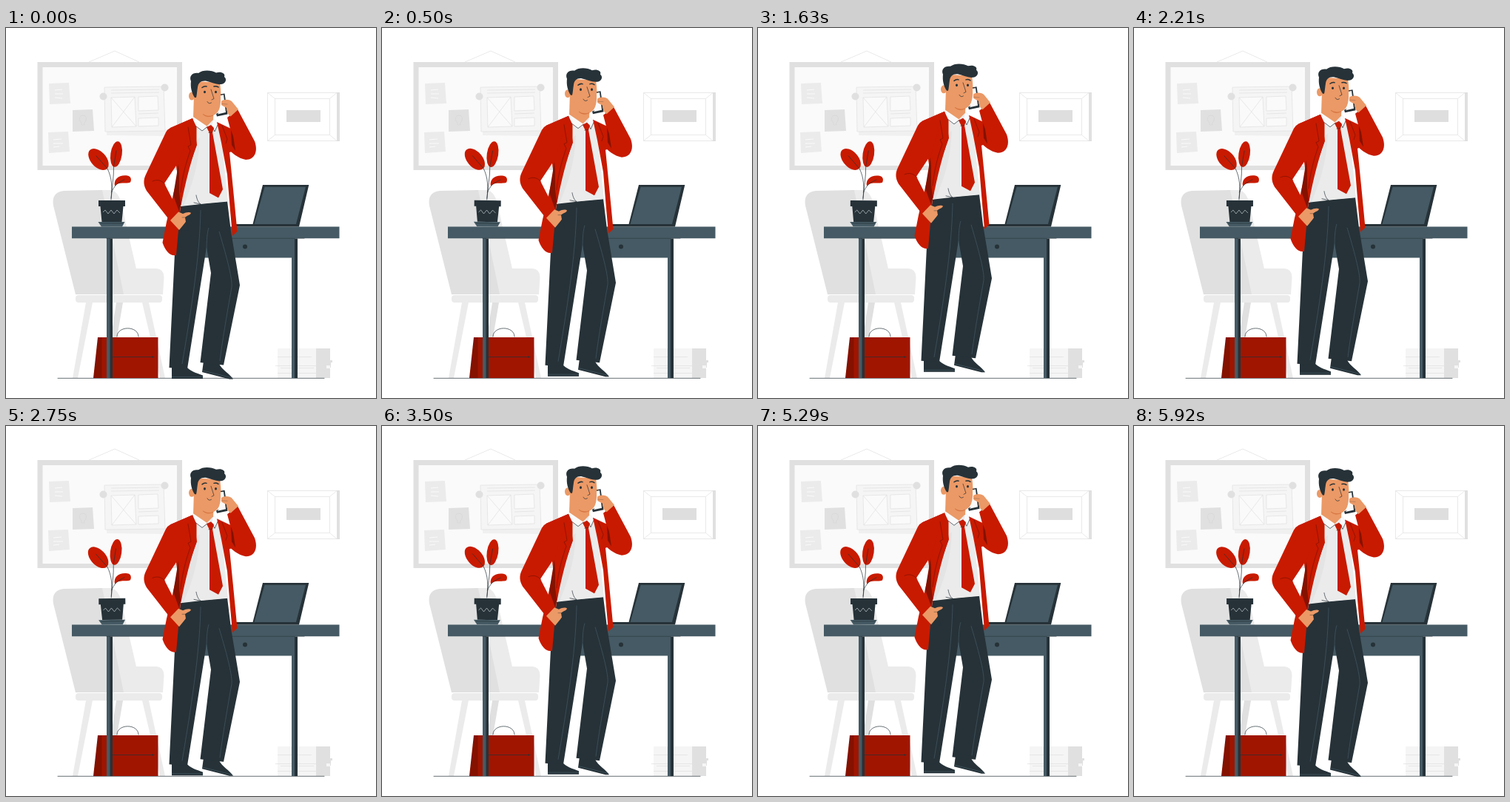
Recreate the animation shown at these times as an HTML page. Size 500 by 500 pixels, loop 5960 ms.

```html
<!DOCTYPE html>
<html lang="en">
<head>
<meta charset="utf-8">
<title>Office call</title>
<style>
  html, body { margin: 0; width: 100%; height: 100%; overflow: hidden; background: #fff; }
  svg { display: block; width: 100vw; height: 100vh; }
  .red { fill: #c81a00; }
  .wine { fill: #851100; }
  .ink { fill: #263238; }
  .slate { fill: #455a64; }
  .skin { fill: #eb9966; }
  .g1 { fill: #fafafa; }
  .g2 { fill: #ebebeb; }
  .g3 { fill: #e0e0e0; }
  .line { fill: none; stroke: #263238; stroke-width: .7; stroke-linecap: round; stroke-linejoin: round; }
  .brow { stroke-width: 1.5; }
  .pale { fill: none; stroke: #e0e0e0; stroke-width: .7; }
  .seam { fill: none; stroke: #455a64; stroke-width: .7; }
  .fold { fill: none; stroke: #7d1000; stroke-width: .7; stroke-linecap: round; }
</style>
</head>
<body>
<svg viewBox="0 0 500 500">
  <!-- whiteboard -->
  <path class="pale" d="M112 46L147 31L180 46"/>
  <path class="g3" d="M42.500 46H238V192H42.500Z"/>
  <path class="g1" d="M49.500 53H231V186H49.500Z"/>
  <path class="g2" d="M58 75L85 74L87 102L59 103ZM57 141L84 140L86 167L58 169Z"/>
  <path class="g3" d="M90 111L117 110L119 139L90 140Z"/>
  <path d="M102 128C98 124 99 118 104 118C109 118 110 124 106 128V131H102Z" fill="none" stroke="#d6d6d6" stroke-width=".7"/>
  <path d="M66 84l10-1M66 89h11M66 94l10 1M64 151l11-1M64 156h13M64 161l8-1" fill="none" stroke="#fafafa"/>
  <path d="M136 140L216 137L217 146L136 145Z" fill="#f0f0f0"/>
  <path d="M133 80L213 79L215 139L134 140Z" fill="#f5f5f5" stroke="#e0e0e0" stroke-width=".7"/>
  <path class="pale" d="M142 84L207 83M142 88L207 87M179 116L206 115"/>
  <path class="g1" d="M142 94L174 93L176 133L143 134ZM179 93L205 92L206 111L179 112ZM179 122L206 121V132L179 133Z" stroke="#e0e0e0" stroke-width=".7"/>
  <path class="pale" d="M142 94L176 133M174 93L143 134"/>
  <g class="g3"><circle cx="131.500" cy="92.500" r="5"/><circle cx="214.500" cy="80.500" r="5"/></g>

  <!-- picture frame -->
  <path class="g3" d="M447 87H451V153H447Z"/>
  <path class="pale" d="M353.500 87.500H450.500V152.500H353.500ZM363.500 95.500H437.500V144.500H363.500ZM353.500 87.500L363.500 95.500M447 87.500L437.500 95.500M447 152.500L437.500 144.500M353.500 152.500L363.500 144.500"/>
  <path d="M379 111H425V127H379Z" fill="#dedede"/>

  <!-- chair -->
  <path class="g2" d="M108 371H117L97 473H90ZM184 371H193L215 473H208Z"/>
  <path class="g3" d="M149 371H158L150 418H142Z"/>
  <path class="g2" d="M125 219H141Q152 220 156 238L176 325H202Q213 325 213.500 337L212 360H150Z"/>
  <path class="g3" d="M78 220L130 219L159 360H94L64 240Q61 222 78 220Z"/>
  <rect class="g2" x="94" y="361" width="117" height="10" rx="4"/>

  <!-- papers -->
  <path d="M367 433H419V473H367Z" fill="#f5f5f5"/>
  <path class="g3" d="M419 433H438V449H441V452H439V459H438V473H419Z"/>
  <path d="M433 456H438V460H433Z" fill="#f5f5f5"/>
  <path class="pale" d="M367 444.500H413M364 456.500H419M371 459.500H416M367 466.500H419"/>
  <path class="line" d="M70 473.300H430"/>

  <!-- bag -->
  <path class="wine" d="M124 418H131L130 473H118Z"/>
  <path d="M129.500 418H205.500V473H129.500Z" fill="#a01500"/>
  <path class="line" d="M144 444.500H200M150 417C150 402 179 402 179 417"/>
  <circle class="ink" cx="198" cy="444.500" r="1"/>

  <!-- desk -->
  <path class="slate" d="M240 284H388V310.500H240ZM136 284H141V473H136ZM386 284H390.500V473H386ZM89 268.400H450.500V284.300H89Z"/>
  <path class="ink" d="M140.500 284.500H144V473H140.500ZM390 284.500H394V473H390Z"/>
  <path class="line" d="M136 284.300H403" stroke-opacity=".7"/>
  <circle class="ink" cx="323" cy="295.500" r="3"/>
  <path class="ink" d="M347 212H409.300L396 268.400H308V265H333.500Z"/>
  <path class="slate" d="M349.500 214.800H405L392 265H335.500Z"/>

  <g id="plant">
    <ellipse class="red" cx="125" cy="177.500" rx="17" ry="10.300" transform="rotate(48 125 177.500)"/>
    <ellipse class="red" cx="149" cy="170.500" rx="7.700" ry="17.500" transform="rotate(8 149 170.500)"/>
    <path class="red" d="M147 213.500C145 204 153 198 164 199.500C169 200 170 205 168 208.500C162 211 153 207 147 213.500Z"/>
    <path class="line" d="M142 232C144 215 143 202 137 190L122 173M142 230C143 215 146 202 145.500 187L149 166M142.500 222C146 214 150 209 160 205"/>
    <path class="ink" d="M125 233H161V241H158.500L156.500 262H129.500L127.500 241H125Z"/>
    <path d="M131 249l3-3 4 5 4-5 4 5 4-5 4 4" fill="none" stroke="#c5ccd0" stroke-width=".7"/>
    <path class="slate" d="M124.500 262H160.500L157 268.400H129Z"/>
    <path class="line" d="M128 264H158"/>
  </g>

  <g id="man">
    <!-- shoes and trousers -->
    <path class="ink" d="M224 458H244C249 464 257 466 266 469.500V474H224ZM267 450L288 454C292 462 302 467 307 474.500L302 474.500L265 465Z"/>
    <path class="seam" d="M224 471.500H266M266 463L306 473"/>
    <path class="ink" d="M236 240L299 234L304 275L316 347.500L294 455.500L262.500 452L277 331L271 296L245 460.500L220.500 459L228 305Z"/>
    <path class="seam" d="M263 246C262 300 254 360 238 454M274 270C272 276 271 286 271 302M288 275C300 315 306 340 305 350C298 390 292 425 289 450"/>

    <!-- shirt and tie -->
    <path class="g2" d="M252 121L282 123L290 138L300 234.500Q268 237 236 241L240 190Z"/>
    <path class="g3" d="M257 152L262 148C260 190 250 215 240 240L236 241Z" opacity=".6"/>
    <path class="line" d="M257 226C258 232 260 236 263 238M254 236L263 238"/>
    <path class="skin" d="M254 90L253 121L271 133L280 124L281 110Z"/>
    <path class="g1" d="M253 120L272 133L265 139L252 129ZM281 122L286 131L282 140L278 132Z"/>
    <path class="line" d="M252 129L265 139L272 133.500M279 134L282 140L286 131"/>
    <path class="red" d="M271 134L277 131L281 135L279 141L293 218L287 229.500L275 223L275 142Z"/>
    <path class="fold" d="M274 141.500L279 140.500"/>

    <!-- jacket -->
    <path class="red" d="M285 127L304 136L308 166L302 168L307 218L312.500 275L306 281L302 235L299 198L291 155Z"/>
    <path class="red" d="M252 122L222 135L232 200L217 262L211.500 290C215 301 222 309 230 307L236 240L243 200L258 158Z"/>
    <path class="wine" d="M233 184L226 226L234 248L237 236Z"/>
    <path class="red" d="M252 122L222 135Q218 137 216 141L189 198C185 206 186 213 190 220L222 261L234 249L214 210L234 180Z"/>
    <path class="red" d="M252 122L257.500 134V158C250 180 242 210 236.500 240L234 222L234 180Z"/>
    <path class="fold" d="M198 207C205 204 210 206 215 211M246 134L250 158L246 160L249 166C244 180 238 200 236 222M292 132L299 150L297 156"/>
    <path class="red" d="M299 121L313 110L336 153C341 167 336 178 324 178C314 176 304 169 299 161L304 140Z"/>
    <path class="wine" d="M304 138L307 146L310 166L305 158Z"/>

    <!-- pocket hand -->
    <path class="skin" d="M233 248.500L239 251C243 249 248 248 250 250C249 253 245 253 242 256L243 262L234 273L222 260Z"/>
    <path class="line" d="M242 256L238 256" stroke-opacity=".6"/>
    <path class="ink" d="M237 273L244 260L247 274Z"/>

    <!-- head -->
    <path class="skin" d="M257 72L289 74C291 86 291 102 288 110C284 119 275 121 267 117L254 108L254 90Z"/>
    <path d="M266 116.500Q273 121 280 118Q272 122 266 116.500Z" fill="#d06f3c" stroke="#d06f3c" stroke-width=".5"/>
    <ellipse class="skin" cx="251" cy="92" rx="4" ry="5.500"/>
    <path class="ink" d="M255 94C251 88 249 80 250 72C247 65 252 60 260 61C266 56 278 57 284 60.500C290 58.500 297 61 295 66C299 69 297 75 291 76C284 77 277 73 270 71.500C263 71 260 74 259 80C258 86 258 90 257 94Z"/>
    <ellipse class="ink" cx="268.500" cy="86.500" rx="1.500" ry="1.800"/>
    <ellipse class="ink" cx="283.500" cy="86.500" rx="1.500" ry="1.800"/>
    <path class="line brow" d="M265 80.500Q268 78 271 79M281 79Q284 78 287 80"/>
    <path class="line" d="M277 83L281 95.500L278 97M272 99.500Q274 103.500 277.500 101"/>

    <!-- phone and hand -->
    <path class="ink" d="M290 89.500L295.500 88.500L299.500 116.500L285 119.500L284 116L290 113Z"/>
    <path class="g1" d="M290 91L294 90.300L297 114L286 116.500L290 110Z"/>
    <path class="skin" d="M291 99C294 96 301 96 305 99L314 110L303.500 119.500C300 117 298 112 298 108C295 106 291 105 291 103Z"/>
    <path class="line" d="M292 102.500L299 103" stroke-opacity=".35"/>
  </g>
</svg>
<script>
  const LOOP = 5960;
  const man = document.getElementById('man');
  const plant = document.getElementById('plant');

  // Triangle wave: 0 → 1 → 0 over one period.
  const triangle = (t, period) => {
    const p = (t % period) / period;
    return 1 - Math.abs(1 - 2 * p);
  };

  function draw(now) {
    const t = now % LOOP;
    const lift = -10 * triangle(t, 3000);
    const sway = 2 * triangle(t + 375, 1500) - 1;
    man.setAttribute('transform', `translate(0 ${lift})`);
    plant.setAttribute('transform', `rotate(${sway} 140 210.500)`);
    requestAnimationFrame(draw);
  }
  draw(performance.now());
</script>
</body>
</html>
```
